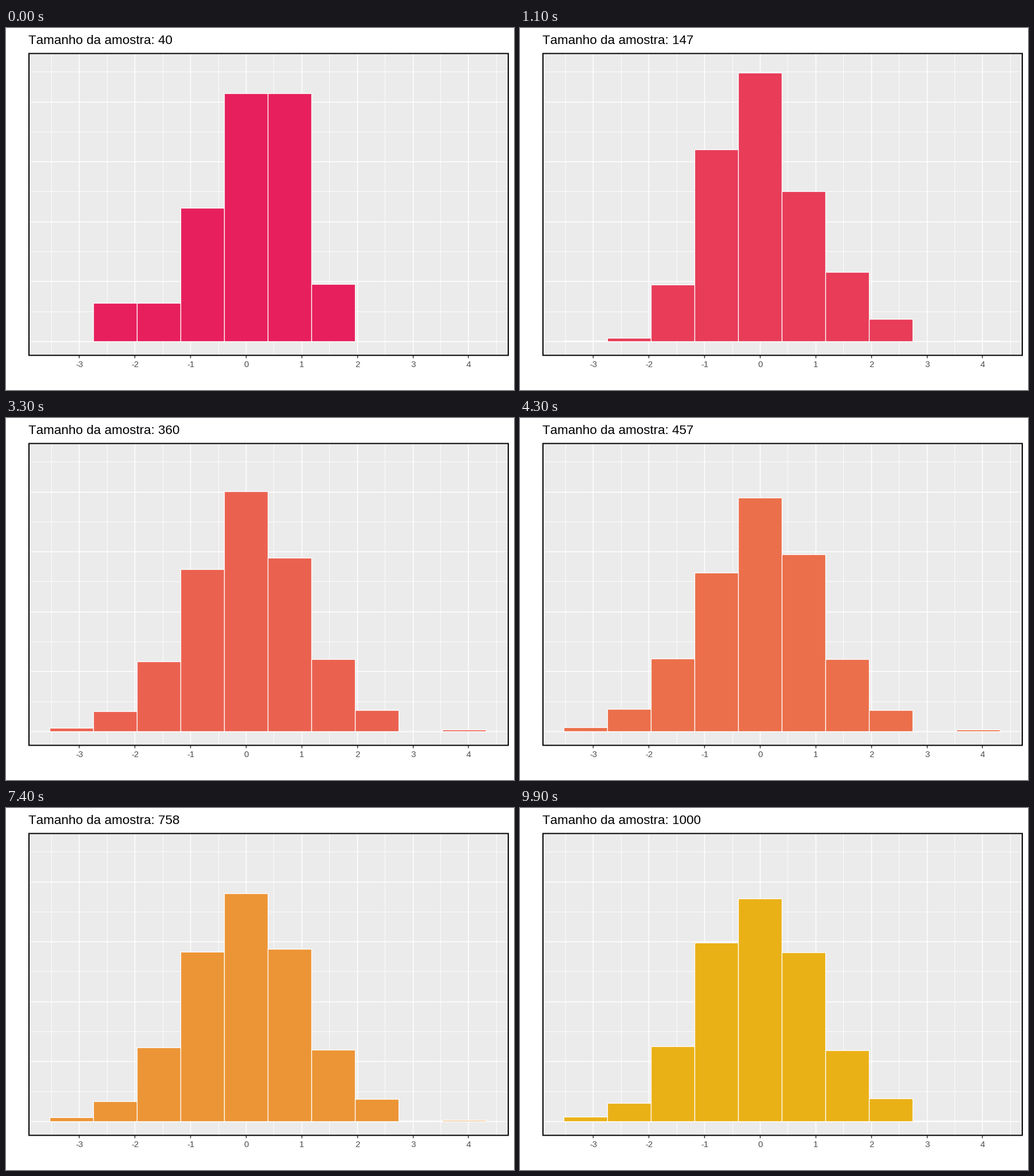
These frames come from a looping animation (885x632 px, 10 s). A matplotlib script:

```python
import numpy as np
import matplotlib.pyplot as plt
from matplotlib.animation import FuncAnimation
from matplotlib.patches import Rectangle

W, H, DPI = 885, 632, 100
PT = 72 / DPI                       # points per pixel
FRAMES, INTERVAL = 100, 100

X0, UNIT = 418.5, 96.86             # pixel of x = 0, pixels per unit
BASE, STEP = 547.5, 104.62          # histogram floor, major grid spacing
LEFT, BIN = 76.5, 76                # first bin edge, bin width
AREA = 4000 / 3                     # summed height of all bars
PANEL = (40, 44.5, 835, 527)

# Bin counts for samples of 40, 100, 400 and 1000 values
COUNTS = np.array([
    [0, 2, 2, 7, 13, 13, 3, 0, 0, 0],
    [0, 0, 7, 26, 36, 19, 9, 3, 0, 0],
    [2, 12, 38, 82, 123, 93, 38, 11, 0, 1],
    [6, 24, 98, 234, 292, 221, 93, 30, 1, 1],
])
SIZES = COUNTS.sum(axis=1)
KEYS = np.round((SIZES - 40) / 960 * (FRAMES - 1))
HEIGHTS = COUNTS / SIZES[:, None] * AREA

# sRGB <-> Lab, for the colour ramp
XYZ = np.array([[0.4124, 0.3576, 0.1805],
                [0.2126, 0.7152, 0.0722],
                [0.0193, 0.1192, 0.9505]])
WHITE = XYZ.sum(axis=1)
LAB = np.array([[0, 116, 0], [500, -500, 0], [0, 200, -200]])


def to_lab(rgb):
    c = np.array(rgb) / 255
    lin = np.where(c > 0.04045, ((c + 0.055) / 1.055) ** 2.4, c / 12.92)
    t = XYZ @ lin / WHITE
    f = np.where(t > 0.008856, np.cbrt(t), 7.787 * t + 16 / 116)
    return LAB @ f - [16, 0, 0]


def to_rgb(lab):
    f = np.linalg.solve(LAB, lab + [16, 0, 0])
    t = np.where(f > 0.2069, f ** 3, (f - 16 / 116) / 7.787)
    lin = np.clip(np.linalg.solve(XYZ, t * WHITE), 0, 1)
    return np.where(lin > 0.0031308,
                    1.055 * lin ** (1 / 2.4) - 0.055, 12.92 * lin)


LOW, HIGH = to_lab((231, 31, 93)), to_lab((234, 177, 23))


def pixel(v):
    """Centre of the pixel that holds v."""
    return np.floor(v) + 0.5


plt.rcParams["font.family"] = "Liberation Sans"
plt.rcParams["text.kerning_factor"] = 6
plt.rcParams["axes.unicode_minus"] = False

fig = plt.figure(figsize=(W / DPI, H / DPI), dpi=DPI, facecolor="white")
ax = fig.add_axes([0, 0, 1, 1])
ax.set_xlim(0, W)
ax.set_ylim(H, 0)
ax.axis("off")


def line(xs, ys, width, color, z):
    ax.plot(xs, ys, color=color, lw=width * PT, zorder=z, snap=False,
            solid_capstyle="butt")


def box(x, y, w, h, z, **style):
    return ax.add_patch(Rectangle((x, y), w, h, zorder=z, snap=False, **style))


px, py, pw, ph = PANEL
box(*PANEL, 0, fc="#EBEBEB", ec="none")


def grid(offset, nx, ny, width, z):
    for k in nx:
        x = pixel(X0 + (k + offset) * UNIT)
        line([x, x], [py, py + ph], width, "white", z)
    for k in ny:
        y = pixel(BASE - (k + offset) * STEP)
        line([px, px + pw], [y, y], width, "white", z)


grid(0.5, range(-4, 5), range(5), 0.9, 1)
grid(0, range(-3, 5), range(5), 1.5, 2)

bars = [box(LEFT + i * BIN, BASE, BIN, 0, 3, ec="white", lw=1.3 * PT,
            joinstyle="miter") for i in range(10)]

box(*PANEL, 5, fc="none", ec="black", lw=2 * PT, joinstyle="miter")

for k in range(-3, 5):
    x = pixel(X0 + k * UNIT)
    line([x, x], [572, 576.5], 1.5, "#333333", 4)
    ax.text(x, 592.5, str(k), size=14.9 * PT, color="#4D4D4D",
            ha="center", va="baseline")

title = ax.text(39, 28, "", size=22.4 * PT, color="black",
                ha="left", va="baseline")


def update(i):
    p = i / (FRAMES - 1)
    title.set_text(f"Tamanho da amostra: {round(40 + 960 * p)}")
    color = to_rgb(LOW + (HIGH - LOW) * p)
    for k, bar in enumerate(bars):
        top = pixel(BASE - np.interp(i, KEYS, HEIGHTS[:, k]))
        bar.set_y(top)
        bar.set_height(BASE - top)
        bar.set_facecolor(color)
    return [title, *bars]


anim = FuncAnimation(fig, update, frames=FRAMES, interval=INTERVAL,
                     repeat=True, repeat_delay=0)
plt.show()
```
